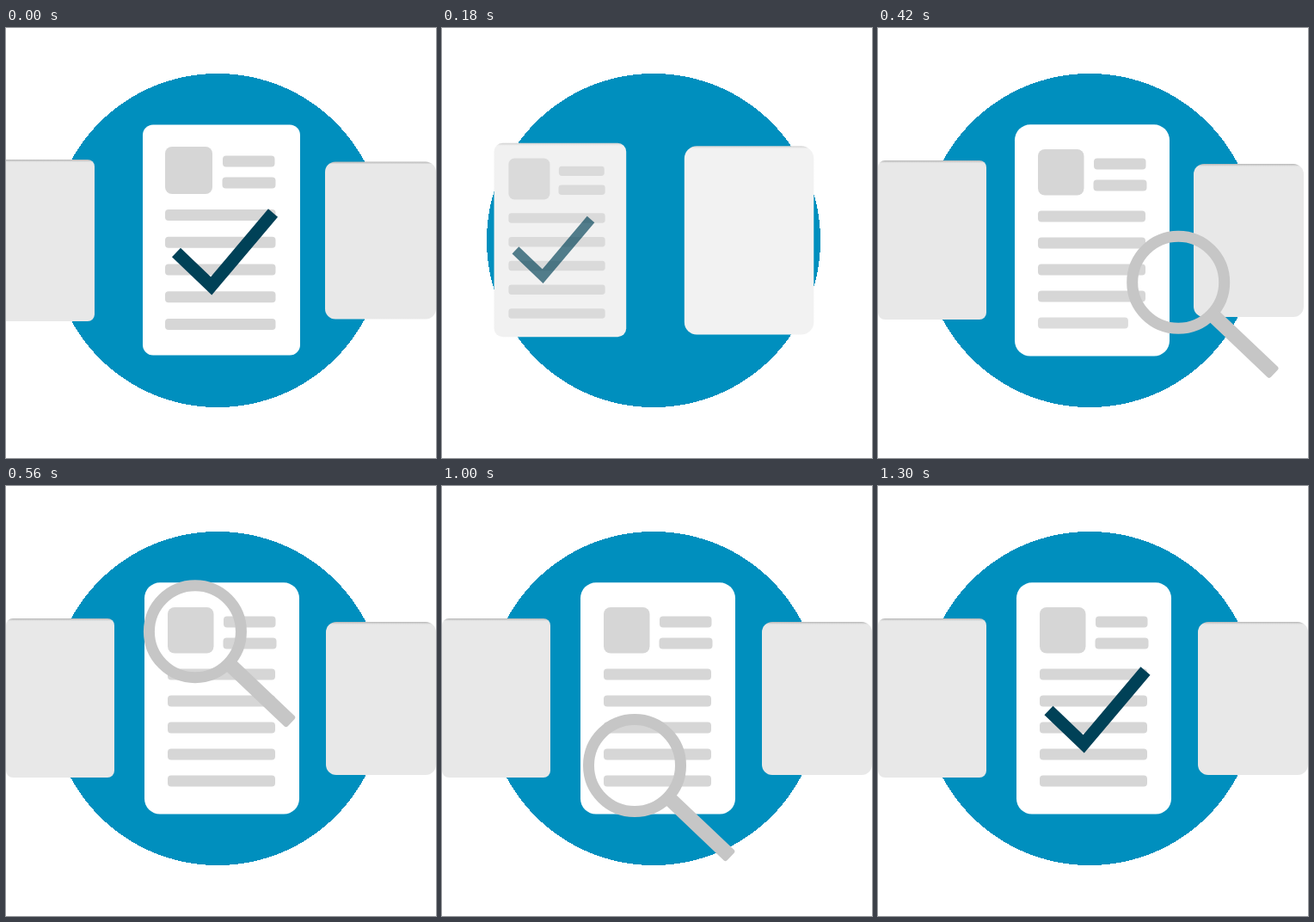
An HTML page with a canvas for the animation above (1440 ms loop, 500x500 px).

```html
<!DOCTYPE html>
<html lang="en">
<head>
<meta charset="utf-8">
<title>Document check</title>
<style>
html, body { margin: 0; width: 100%; height: 100%; overflow: hidden; background: #fff; }
canvas { display: block; }
</style>
</head>
<body>
<canvas id="stage" width="500" height="500"></canvas>
<script>
const ctx = document.getElementById('stage').getContext('2d');
const LOOP = 1440;

// Resting places of the pages, before and after the carousel turns
const firstCenter = { x: 159, y: 112.5, w: 183, h: 268, r: 12 };
const firstRight = { x: 371, y: 155.5, w: 129, h: 183, r: 12 };
const left = { x: 0, y: 154, w: 126, h: 185, r: 8 };
const center = { x: 161, y: 112.3, w: 180, h: 269.2, r: 18 };
const right = { x: 372, y: 158, w: 128, h: 178, r: 12 };

const progress = (t, start, end) => Math.min(1, Math.max(0, (t - start) / (end - start)));
const smooth = (t, start, end) => {
  const u = progress(t, start, end);
  return u * u * (3 - 2 * u);
};
const mix = (a, b, p) => a + (b - a) * p;

function between(a, b, move, size) {
  const pose = { x: mix(a.x, b.x, move) };
  for (const key of ['y', 'w', 'h', 'r']) pose[key] = mix(a[key], b[key], size);
  return pose;
}

const shift = (pose, dx) => ({ ...pose, x: pose.x + dx });

function box(x, y, w, h, r, fill) {
  ctx.fillStyle = fill;
  ctx.beginPath();
  ctx.roundRect(x, y, w, h, r);
  ctx.fill();
}

function disc(cx, cy, radius) {
  ctx.fillStyle = '#008fbe';
  for (let y = cy - radius; y < cy + radius; y++) {
    const half = Math.round(Math.sqrt(radius ** 2 - (y + .5 - cy) ** 2));
    ctx.fillRect(cx - half, y, 2 * half, 1);
  }
}

function page({ x, y, w, h, r }, white) {
  const gray = v => `rgb(${v},${v},${v})`;
  const face = Math.round(mix(232, 255, white));
  const fill = ctx.createLinearGradient(0, y, 0, y + 3);
  fill.addColorStop(0, gray(Math.round(face - 50 * (1 - white))));
  fill.addColorStop(1, gray(face));
  box(x, y, w, h, r, fill);
}

// Each item widens and fades in with its share from grow(i)
function content(x, y, size, barX, lineY, pitch, width, grow = () => 1) {
  const base = ctx.globalAlpha;
  const bar = (i, x, y, w) => {
    ctx.globalAlpha = base * grow(i);
    box(x, y, w * grow(i), 13, 4, '#d6d6d6');
  };
  box(x, y, size, size, 8, '#d6d6d6');
  bar(1, barX, y + 10.5, 60.5);
  bar(2, barX - .5, y + 35.5, 62);
  for (let i = 0; i < 5; i++) bar(i + 3, x, lineY + pitch * i, width);
}

function check(x, y, scale = 1) {
  ctx.save();
  ctx.translate(x, y);
  ctx.scale(scale, scale);
  ctx.strokeStyle = '#004157';
  ctx.lineWidth = 14.5;
  ctx.beginPath();
  ctx.moveTo(-56, .5);
  ctx.lineTo(-15.3, 39.5);
  ctx.lineTo(56.5, -45.5);
  ctx.stroke();
  ctx.restore();
}

function magnifier(x, y) {
  ctx.save();
  ctx.translate(x, y);
  ctx.strokeStyle = '#c6c6c6';
  ctx.lineWidth = 13;
  ctx.beginPath();
  ctx.arc(0, 0, 53.5, 0, 7);
  ctx.stroke();
  ctx.rotate(.76);
  box(56, -8.5, 98, 17, 3, '#c6c6c6');
  ctx.restore();
}

function drawCheckedPage(t) {
  const move = smooth(t, 0, 312), size = smooth(t, 0, 355);
  const pose = between(firstCenter, left, move, size);
  const middle = pose.x + pose.w / 2;
  const fade = 1 - progress(t, 100, 340);
  page(pose, 1 - move);

  ctx.save();
  ctx.globalAlpha = Math.sqrt(fade);
  ctx.translate(middle - 1.5 - 5 * size, 245);
  ctx.scale(1 - .245 * size, 1 - .245 * size);
  ctx.translate(-249, -245);
  content(185, 138, 55, 252, 211, 31.75, 128.5);
  ctx.globalAlpha = fade;
  ctx.restore();

  ctx.globalAlpha = fade;
  check(middle + 3.5 - 23 * size, 260.5 - 5 * size, 1 - .43 * size);
  ctx.globalAlpha = 1;
}

function drawNextPage(t, sway) {
  const move = smooth(t, 0, 405);
  const pose = shift(between(firstRight, center, move, move), sway * move);
  page(pose, move);

  ctx.save();
  ctx.globalAlpha = progress(t, 220, 300);
  ctx.translate(pose.x - center.x, 0);
  content(188, 141, 53.5, 253, 212.5, 31, 125, i => progress(t, 220 + 22 * i, 276 + 22 * i));
  ctx.restore();
}

// The lens swings in from the right, then scans down the page
function drawMagnifier(t) {
  const enter = progress(t, 320, 595);
  const scan = smooth(t, 595, 940);
  const x = mix(574, 216, 1 - (1 - enter) ** 2.16) + 8 * scan;
  const y = mix(355, 161, smooth(t, 320, 595)) + 164 * scan + 3 * smooth(t, 1000, 1080);
  ctx.globalAlpha = 1 - progress(t, 1010, 1080);
  magnifier(x, y);
  ctx.globalAlpha = 1;
}

function draw(t) {
  const sway = -5 * (1 - smooth(t, 420, 550));
  ctx.clearRect(0, 0, 500, 500);
  disc(246, 247, 194);

  page(shift({ ...left, y: 153, h: 188 }, -23 - 130 * smooth(t, 0, 150)), 0);
  drawCheckedPage(t);
  drawNextPage(t, .4 * sway);
  page(shift(right, sway + 150 * (1 - smooth(t, 180, 400))), 0);
  drawMagnifier(t);

  const away = (1 - progress(t, 1120, 1300)) ** 2;
  check(254.5 + 308 * away, 260.5 + 290 * away);
}

const start = performance.now();
function frame() {
  draw((performance.now() - start) % LOOP);
  requestAnimationFrame(frame);
}
frame();
</script>
</body>
</html>
```
